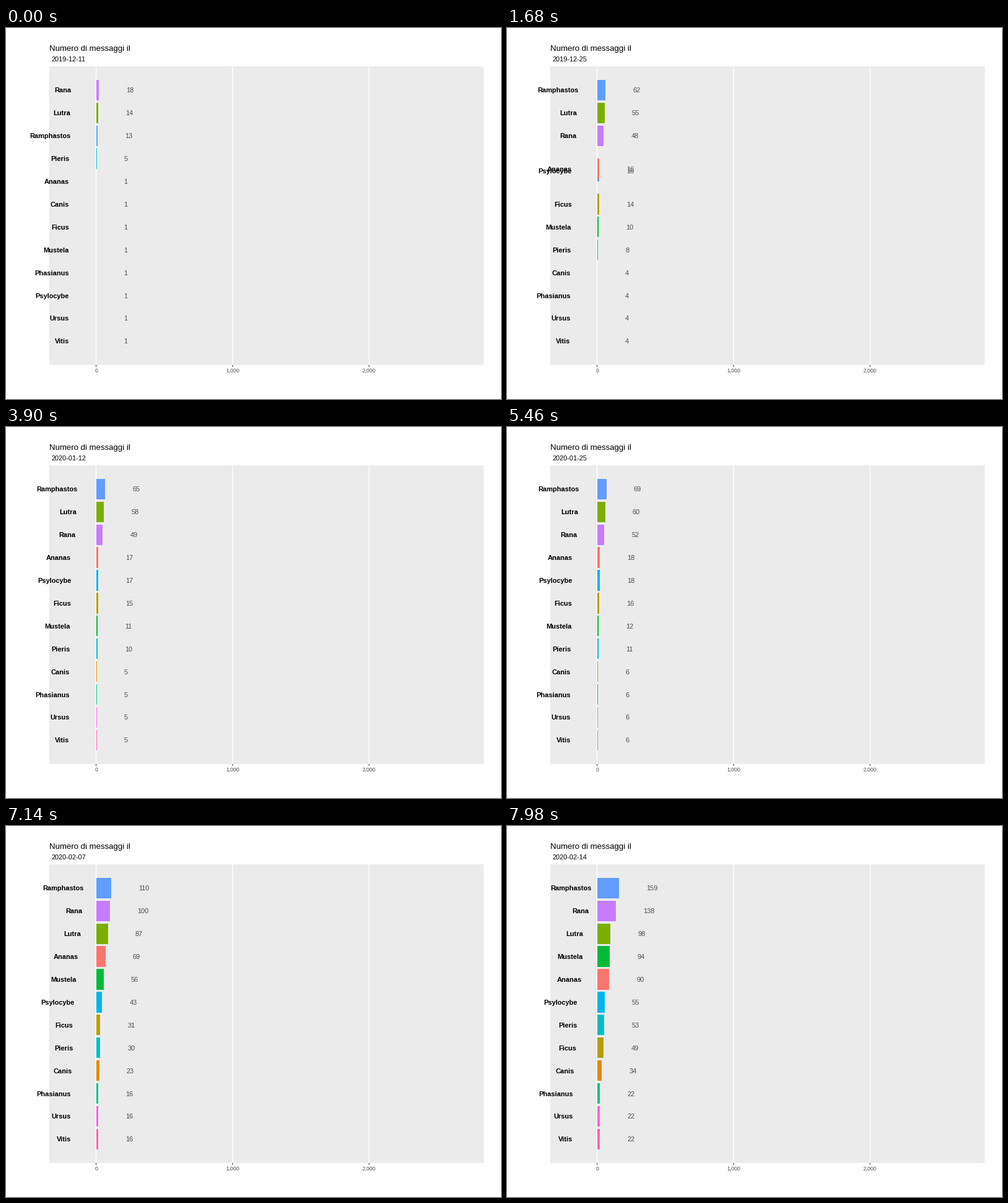
A matplotlib script that plays this animation: 800x600 px, repeating every 8000 ms.

```python
import matplotlib.pyplot as plt
import numpy as np
from matplotlib.animation import FuncAnimation
from matplotlib.patches import Rectangle

plt.rcParams["font.family"] = "Liberation Sans"

W, H, DPI = 800, 600, 100
TICK, STEP, LOOP = 20, 60, 8000      # ms
DAYS_PER_STEP = 0.4898
BLEND = 0.54                         # share of the new day on a change step
X0, UNIT = 145.6, 0.2206             # pixel of zero, pixels per message
ROW0, ROW_H = 100.35, 36.91
BAR_HALF = 0.45 * ROW_H
GREY = "#4D4D4D"

# name: colour, running total at each milestone
LOW = [1, 2, 3, 4, 5, 6, 10, 16, 22]
SPECIES = {
    "Ananas": ("#F8766D", [1, 11, 15, 16, 17, 18, 50, 69, 90]),
    "Canis": ("#DE8C00", [1, 2, 3, 4, 5, 6, 10, 23, 34]),
    "Ficus": ("#B79F00", [1, 11, 14, 14, 15, 16, 22, 31, 49]),
    "Lutra": ("#7CAE00", [14, 49, 54, 55, 58, 60, 76, 87, 98]),
    "Mustela": ("#00BA38", [1, 8, 9, 10, 11, 12, 35, 56, 94]),
    "Phasianus": ("#00C08B", LOW),
    "Pieris": ("#00BFC4", [5, 7, 8, 8, 10, 11, 15, 30, 53]),
    "Psylocybe": ("#00B4F0", [1, 13, 16, 16, 17, 18, 30, 43, 55]),
    "Ramphastos": ("#619CFF", [13, 57, 61, 62, 65, 69, 92, 110, 159]),
    "Rana": ("#C77CFF", [18, 44, 48, 48, 49, 52, 74, 100, 138]),
    "Ursus": ("#F564E3", LOW),
    "Vitis": ("#FF64B0", LOW),
}

# Milestone position of each day, with quiet spells in between
days = np.arange(67)
progress = np.interp(
    days,
    [0, 7, 13, 14, 21, 24, 31, 38, 44, 45, 52, 53, 58, 65],
    [0, 1, 2, 3, 3.49, 3.49, 4, 4, 5, 5, 5.97, 6, 7, 8],
)
totals = np.array([
    np.floor(np.interp(progress, range(9), v) + 0.4) for _, v in SPECIES.values()
]).T
# Rank per day; ties stay in alphabetical order
ranks = np.argsort(np.argsort(-totals, axis=1, kind="stable"), axis=1)

fig = plt.figure(figsize=(W / DPI, H / DPI), dpi=DPI, facecolor="white")
ax = fig.add_axes([0, 0, 1, 1])
ax.set_xlim(0, W)
ax.set_ylim(H, 0)
ax.axis("off")


def write(x, y, s, px, **kw):
    return ax.text(x, y, s, fontsize=px * 72 / DPI, va="baseline", **kw)


def line(x, y0, y1, px, color):
    ax.plot([x, x], [y0, y1], color=color, lw=px * 72 / DPI, zorder=1,
            solid_capstyle="butt", snap=False)


ax.add_patch(Rectangle((70, 62), 702, 483, fc="#EBEBEB", lw=0, zorder=0))
for value in (0, 1000, 2000):
    x = X0 + value * UNIT
    line(x, 62, 545, 1.42, "white")
    line(x, 545, 548, 1.07, "#333333")
    write(x, 557, f"{value:,}", 8.8, ha="center", color=GREY)

write(70, 37, "Numero di messaggi il", 13.2)
date = write(73, 54, "", 11)

bars, names, counts = [], [], []
for k, (name, (color, _)) in enumerate(SPECIES.items()):
    bar = Rectangle((146, 0), 0, 0, fc=color, lw=0, antialiased=False,
                    zorder=2 - k * 0.01)
    bars.append(ax.add_patch(bar))
    names.append(write(0, 0, name, 11.04, ha="right", weight="bold", color="black"))
    counts.append(write(0, 0, "", 11.04, color=GREY))


def day_at(step):
    return int(np.floor(step * DAYS_PER_STEP + 0.5))


def draw(frame):
    step = frame * TICK // STEP
    day = day_at(step)
    before = day_at(step - 1) if step else day
    mix = BLEND if before < day else 1
    value = totals[before] + (totals[day] - totals[before]) * mix
    rank = ranks[before] + (ranks[day] - ranks[before]) * mix

    date.set_text(str(np.datetime64("2019-12-11") + day))
    for k, bar in enumerate(bars):
        y = ROW0 + rank[k] * ROW_H
        x = X0 + value[k] * UNIT
        top, bottom = round(y - BAR_HALF), round(y + BAR_HALF)
        width = max(0, int(np.floor(x + 0.5)) - 146)
        bar.set_bounds(146, top, width, bottom - top)
        bar.set_visible(width > 0)
        base = round(y + 4)
        names[k].set_position((x - 200 * UNIT, base))
        counts[k].set_position((x + 200 * UNIT, base))
        counts[k].set_text(f"{totals[day][k]:.0f}")
    return [date, *bars, *names, *counts]


anim = FuncAnimation(fig, draw, frames=LOOP // TICK, interval=TICK,
                     repeat=True, repeat_delay=0)
plt.show()
```
